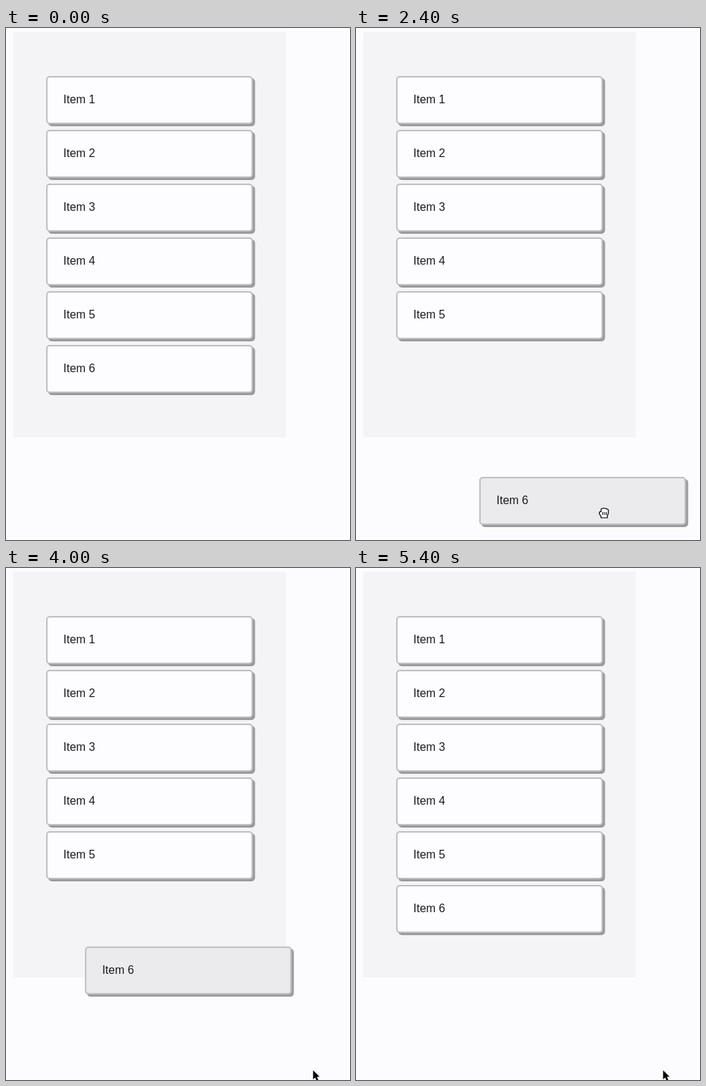
Animation, 480 px wide and 714 px high, one loop 5880 ms. Source, as an HTML page with a canvas:

```html
<!DOCTYPE html>
<html lang="en">
<head>
<meta charset="utf-8">
<title>Draggable list</title>
<style>
  html, body { margin: 0; width: 100%; height: 100%; overflow: hidden; background: #fcfbfe; }
  canvas { display: block; }
</style>
</head>
<body>
<canvas width="480" height="714"></canvas>
<script>
const ctx = document.querySelector('canvas').getContext('2d');
const LOOP = 5880, STEP = 40;
const HOME = { x: 56, y: 67, pitch: 75 };
const GRAB = [221.5, 486.5];
const DROP = [116, 184];

const arrowPath = new Path2D('M.5 .5V13.2L3.4 10.5L5.6 15.6L8 14.6L5.8 9.6H9.6Z');
const handPath = new Path2D('M-4 7V5Q-7 2-6.5 0Q-6-2-4-1.5V-4q0-2 1.8-2q1-.8 2.2 0q1.2-.6 2.2 .2q1.2-.4 2 .6q2 0 2 2v3q0 2-1.5 4V7Z');
const fingers = new Path2D('M-1.5-1v4M1-1v4M3.3-1v4');

const clamp = v => Math.max(0, Math.min(1, v));
const progress = (t, from, to) => clamp((t - from) / (to - from));
const easeOut = (p, power) => 1 - (1 - p) ** power;
const mix = (a, b, p) => a.map((v, i) => v + (b[i] - v) * p);
const add = (a, b) => a.map((v, i) => v + b[i]);

// Offset of the held item: it speeds up, then settles at the drop point.
function drag(t) {
  if (t < 1520) return mix([0, 0], [99, 165], progress(t, 920, 1520) ** 2);
  return mix([99, 165], DROP, easeOut(progress(t, 1520, 2160), 4));
}

function itemOffset(t) {
  if (t < 960) return [0, 0];
  return t < 2400 ? drag(t) : mix(DROP, [0, 0], progress(t, 2400, 5400));
}

function cursorAt(t) {
  if (t < 720) return mix([271, 570], [220, 486], easeOut(progress(t, 120, 680), 2));
  if (t < 960) return GRAB;
  if (t < 2400) return add(GRAB, drag(t + 38));
  return mix(add(GRAB, DROP), [428, 700], easeOut(progress(t, 2400, 2900), 2));
}

function box(x, y, w, h, r, color) {
  ctx.fillStyle = color;
  ctx.beginPath();
  ctx.roundRect(x, y, w, h, r);
  ctx.fill();
}

function drawItem(n, [dx, dy], fill) {
  const x = HOME.x + dx, y = HOME.y + (n - 1) * HOME.pitch + dy;
  box(x + 3, y + 3, 288.5, 67, 5, '#9b9a9d');
  box(x, y, 288.5, 67, 5, '#bfbec1');
  box(x + 2, y + 2, 284.5, 63, 3, fill);
  ctx.fillStyle = '#1c1c1e';
  ctx.fillText('Item ' + n, x + 24, y + 38);
}

function drawCursor([x, y], hand) {
  ctx.save();
  ctx.lineJoin = 'round';
  if (hand) {
    ctx.translate(x + 8.5, y + 5.5);
    ctx.fillStyle = '#fff';
    ctx.strokeStyle = '#000';
    ctx.lineWidth = 1.2;
    ctx.fill(handPath);
    ctx.stroke(handPath);
    ctx.lineWidth = 1;
    ctx.stroke(fingers);
  } else {
    ctx.translate(x, y);
    ctx.strokeStyle = '#fff';
    ctx.lineWidth = 2;
    ctx.stroke(arrowPath);
    ctx.fillStyle = '#000';
    ctx.fill(arrowPath);
  }
  ctx.restore();
}

function draw(t) {
  ctx.fillStyle = '#fcfbfe';
  ctx.fillRect(0, 0, 480, 714);
  ctx.fillStyle = '#f4f3f6';
  ctx.fillRect(10, 5, 380.5, 566);
  ctx.font = '16px "Liberation Sans", Arial, sans-serif';
  for (let n = 1; n < 6; n++) drawItem(n, [0, 0], '#fdfcff');
  const held = t >= 960 && t < 5400;
  drawItem(6, itemOffset(t), held ? '#ebeaec' : '#fdfcff');
  if (t >= 120) drawCursor(cursorAt(t), t >= 720 && t < 2480);
}

const start = performance.now();
function tick() {
  const t = (performance.now() - start) % LOOP;
  draw(Math.floor(t / STEP) * STEP);
  requestAnimationFrame(tick);
}
tick();
</script>
</body>
</html>
```
